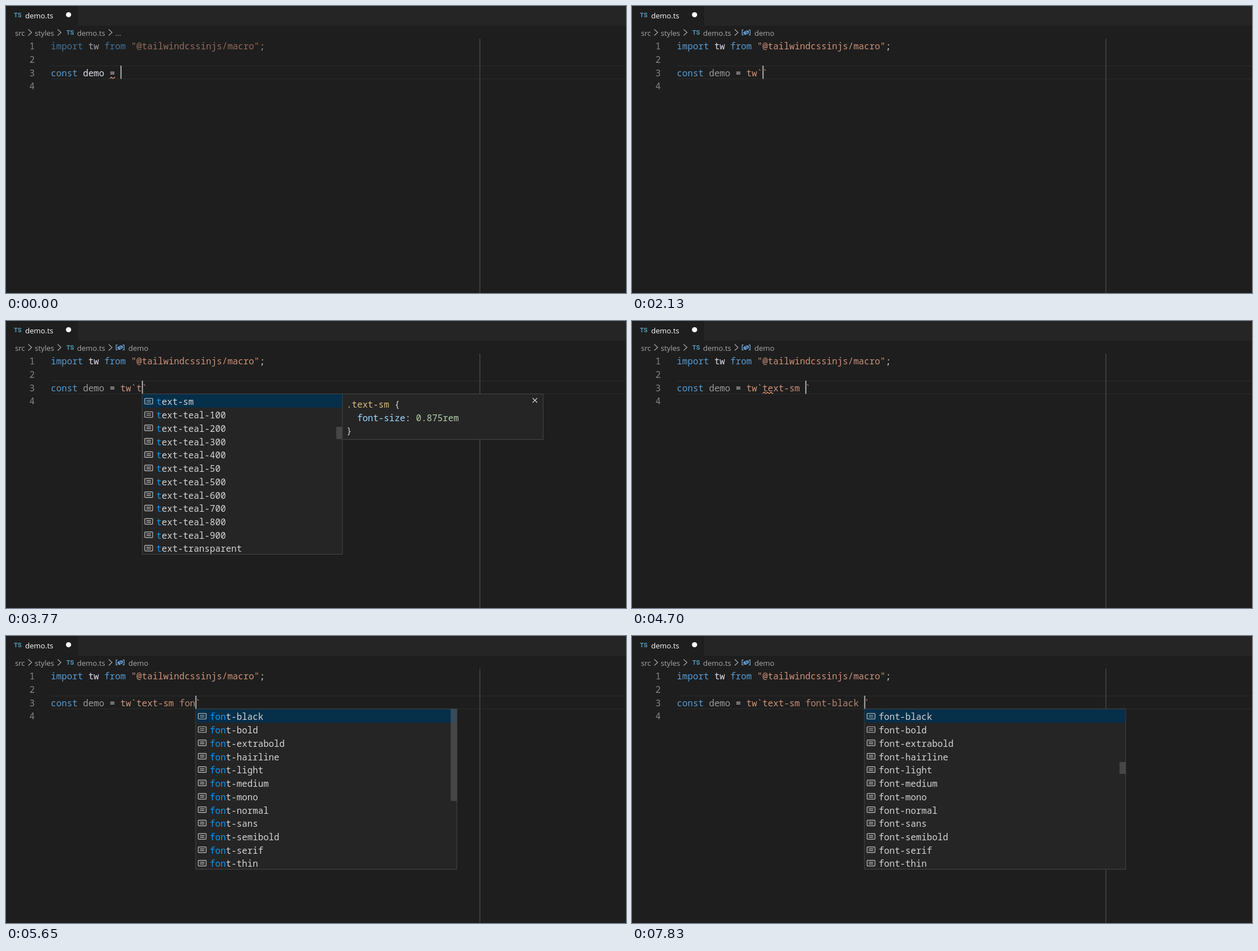
An HTML page with a canvas for the animation above (8 s loop, 1099 by 510 pixels).

```html
<!DOCTYPE html>
<html lang="en">
<head>
<meta charset="utf-8">
<title>Editor completion</title>
<style>
html, body { margin: 0; width: 100%; height: 100%; overflow: hidden; background: #1e1e1e; }
canvas { display: block; }
</style>
</head>
<body>
<canvas id="stage" width="1099" height="510"></canvas>
<script>
const c = document.getElementById('stage').getContext('2d');
const LOOP = 8000, LEFT = 79.5, CHAR = 9.486, ROW = 23.73, POP_TOP = 130;
const MONO = '15.81px "Noto Sans Mono", "DejaVu Sans Mono", monospace';
const UI = '13.1px "Open Sans", "Noto Sans", sans-serif';
const BLUE = '#569cd6', ORANGE = '#ce9178', PLAIN = '#d4d4d4', GREY = '#999999', HIT = '#0a98f5';

// Entries are "icon label"; matched letters stand between asterisks.
const firstList = ['var *t*w', 'key *t*his', 'key *t*hrow', 'box *t*hrow', 'key *t*rue', 'key *t*ry',
  'key *t*ype', 'key *t*ypeof', 'var *t*extWrapper', 'var *T*reeWalker', 'cube *t*hrows', 'cube *t*oString'];
const aliasList = ['var *tw*', 'var *t*ext*W*rapper', 'var *T*ree*W*alker', 'key *t*hro*w*', 'box *t*hro*w*',
  'cube *t*hro*w*s', 'cube *t*ryGetPrevie*w*Data', 'cube doesNot*T*hro*w*'];
const classes = (prefix, names, hit) => names.split(' ').map(n => {
  const label = prefix + n;
  return 'rule ' + (hit ? `*${label.slice(0, hit)}*${label.slice(hit)}` : label);
});
const textList = hit => classes('text-', 'sm teal-100 teal-200 teal-300 teal-400 teal-50 teal-500 teal-600 teal-700 teal-800 teal-900 transparent', hit);
const fontList = hit => classes('font-', 'black bold extrabold hairline light medium mono normal sans semibold serif thin', hit);

const aliasDoc = { height: 92, lines: [['(alias) const tw: any', '#a3a3a3'], ['import tw', '#a3a3a3']] };
const ruleDoc = { height: 81, lines: [['.text-sm ', '#d7ba7d', '{', PLAIN],
  ['  font-size', '#9cdcfe', ': ', PLAIN, '0.875rem', '#b5cea8'], ['}', PLAIN]] };
const closed = { list: null, doc: null };

const steps = [
  [0, { code: '', tail: '', color: PLAIN, caret: true, squiggle: [11, 1], named: false, imported: false, ...closed }],
  [80, { code: 't', squiggle: null }],
  [240, { list: firstList, width: 356, thumb: [130, 40] }],
  [320, { doc: aliasDoc }],
  [460, { code: 'tw', named: true, list: aliasList, thumb: null, note: [4, 'Throw Excep...'] }],
  [840, { imported: true }],
  [930, { caret: false }],
  [1480, { code: 'tw`', caret: true, note: null, ...closed }],
  [1570, { color: ORANGE }],
  [2050, { caret: false }],
  [2130, { caret: true, tail: '`' }],
  [2680, { caret: false }],
  [3130, { caret: true }],
  [3540, { code: 'tw`t', list: [], width: 455 }],
  [3690, { list: textList(1), width: 356, thumb: [188, 22] }],
  [3770, { doc: ruleDoc }],
  [3920, { code: 'tw`te', list: textList(2) }],
  [4300, { code: 'tw`text-sm', ...closed }],
  [4470, { squiggle: [16, 2] }],
  [4700, { code: 'tw`text-sm ' }],
  [5160, { code: 'tw`text-sm f' }],
  [5320, { squiggle: null, list: fontList(1), width: 464, thumb: [170, 60] }],
  [5480, { code: 'tw`text-sm fo', list: fontList(2), thumb: [130, 163] }],
  [5650, { code: 'tw`text-sm fon', list: fontList(3) }],
  [5740, { code: 'tw`text-sm font', list: fontList(4) }],
  [6110, { squiggle: [24, 4] }],
  [6280, { caret: false }],
  [6430, { code: 'tw`text-sm font-black', caret: true, ...closed }],
  [6810, { code: 'tw`text-sm font-black ', squiggle: null }],
  [7210, { list: fontList(0), thumb: [224, 21] }],
  [7300, { caret: false }],
  [7830, { caret: true }]
];

function rect(x, y, w, h, color) {
  c.fillStyle = color;
  c.fillRect(x, y, w, h);
}

function label(text, x, y, color, font = UI) {
  c.font = font;
  c.fillStyle = color;
  c.fillText(text, x, y);
}

// Draws alternating text and colour in the code font.
function run(parts, x, y) {
  for (let i = 0; i < parts.length; i += 2) {
    label(parts[i], x, y, parts[i + 1], MONO);
    x += parts[i].length * CHAR;
  }
}

function stroke(path, x, y, color, width = 1.2) {
  c.save();
  c.translate(x, y);
  c.strokeStyle = color;
  c.lineWidth = width;
  c.stroke(new Path2D(path));
  c.restore();
}

const icons = {
  var: ['M-4.5-4.5H-7V4.5H-4.5M4.5-4.5H7V4.5H4.5M-4-.5L1.5-3.2 4-2V.8L-1.5 3.5-4 2.2ZM-4-.5L-1.5 .8 4-2M-1.5 .8V3.5', '#75beff'],
  key: ['M-7.5-5.5H0V-2.5H-7.5ZM2-4H7.5M-7.5 .5H-1M1 .5H5M-7.5 3.5H2M4 3.5H7.5M-7.5 6.5H-2M0 6.5H7.5', '#c5c5c5'],
  box: ['M-6.5 6V-7H6.5V6M-6.5 6.5h2m1 0h2m1 0h2m1 0h2m1 0h2', '#c5c5c5'],
  cube: ['M0-7L6.5-3.5V3.5L0 7-6.5 3.5V-3.5ZM-6.5-3.5L0 0 6.5-3.5M0 0V7', '#b180d7'],
  rule: ['M-6-5H6Q7-5 7-4V4Q7 5 6 5H-6Q-7 5-7 4V-4Q-7-5-6-5ZM-4-1.5H4M-4 1.5H4', '#c5c5c5']
};
const icon = (name, x, y) => stroke(icons[name][0], x, y, icons[name][1]);

function panel(x, w, h) {
  rect(x, POP_TOP, w, h, '#252526');
  c.strokeStyle = '#454545';
  c.lineWidth = 1;
  c.strokeRect(x + .5, POP_TOP - .5, w - 1, Math.round(h));
}

function popup(s, x) {
  const { list, width, thumb, note, doc } = s;
  if (!list.length) {
    panel(x, width, 26);
    label('Loading...', x + 24, POP_TOP + 19, PLAIN, MONO);
    return;
  }
  panel(x, width, list.length * ROW);
  rect(x + 1, POP_TOP, width - 2, ROW, '#062f4a');
  list.forEach((entry, i) => {
    const [kind, text] = entry.split(' '), y = POP_TOP + 19.4 + i * ROW;
    icon(kind, x + 12.2, y - 6.9);
    run(text.split('*').flatMap((part, n) => [part, n % 2 ? HIT : PLAIN]), x + 25.7, y);
    if (note && note[0] === i) label(note[1], x + 205.2, y, GREY, MONO);
  });
  if (thumb) rect(x + width - 11.4, thumb[0], 10.9, thumb[1], 'rgba(121,121,121,.4)');
  if (!doc) return;
  const dx = x + width - 1;
  panel(dx, 357, doc.height);
  doc.lines.forEach((parts, i) => run(parts, dx + 7.7, POP_TOP + 24 + i * ROW));
  stroke('M-4-4L4 4M4-4L-4 4', dx + 341.8, 141, '#d0d0d0');
}

function header(named) {
  rect(0, 0, 1099, 35, '#252526');
  rect(0, 0, 128, 35, '#1e1e1e');
  const badge = 'bold 11px Roboto, "Open Sans", sans-serif', crumb = '#a9a9a9';
  label('TS', 14, 20, '#519aba', badge);
  label('demo.ts', 34, 21.5, '#ffffff');
  c.beginPath();
  c.arc(110.9, 15.5, 4.6, 0, 7);
  c.fill();
  label('src', 16, 52.5, crumb);
  label('styles', 51, 52.5, crumb);
  label('TS', 107, 51, '#519aba', badge);
  label('demo.ts', 126, 52.5, crumb);
  for (const x of [42.5, 94.5, 185]) stroke('M-3-5.5L3 0-3 5.5', x, 47, crumb);
  if (named) {
    icon('var', 202.3, 47);
    label('demo', 217, 52.5, crumb);
  } else label('...', 193.5, 52.5, crumb);
}

function code(s) {
  const lineY = n => 77.3 + n * 23.65;
  rect(80, 106, 1019, 1, '#2b2b2b');
  rect(80, 129, 1019, 1, '#2b2b2b');
  rect(839.5, 58, 1, 452, '#5a5a5a');
  for (let n = 0; n < 4; n++) label(String(n + 1), 41.5, lineY(n), '#858585', MONO);

  c.globalAlpha = s.imported ? 1 : .667;
  run(['import', BLUE, ' tw ', '#dcdcec', 'from', BLUE, ' "@tailwindcssinjs/macro"', ORANGE, ';', PLAIN], LEFT, lineY(0));
  c.globalAlpha = 1;

  const split = s.code.indexOf(' ') < 0 ? s.code.length : 11;
  run(['const ', BLUE, 'demo', s.named ? GREY : '#dcdcec', ' = ', PLAIN,
    s.code.slice(0, split), s.color, s.code.slice(split), '#b98774', s.tail, ORANGE], LEFT, lineY(2));

  if (s.squiggle) {
    const [col, count] = s.squiggle, w = count * CHAR;
    c.save();
    c.beginPath();
    c.rect(LEFT + col * CHAR, 125, w, 6);
    c.clip();
    stroke('M0 3' + 'l3-2.6 3 2.6'.repeat(Math.ceil(w / 6)), LEFT + col * CHAR, 126, '#e3976e', 1.1);
    c.restore();
  }
}

function draw() {
  const t = performance.now() % LOOP;
  const s = Object.assign({}, ...steps.filter(([at]) => at <= t).map(([, change]) => change));
  const x = LEFT + (13 + s.code.length) * CHAR;
  rect(0, 0, 1099, 510, '#1e1e1e');
  header(s.named);
  code(s);
  if (s.caret) rect(x, 106, 2, 23.5, '#aeafad');
  if (s.list) popup(s, x);
  requestAnimationFrame(draw);
}
draw();
</script>
</body>
</html>
```
